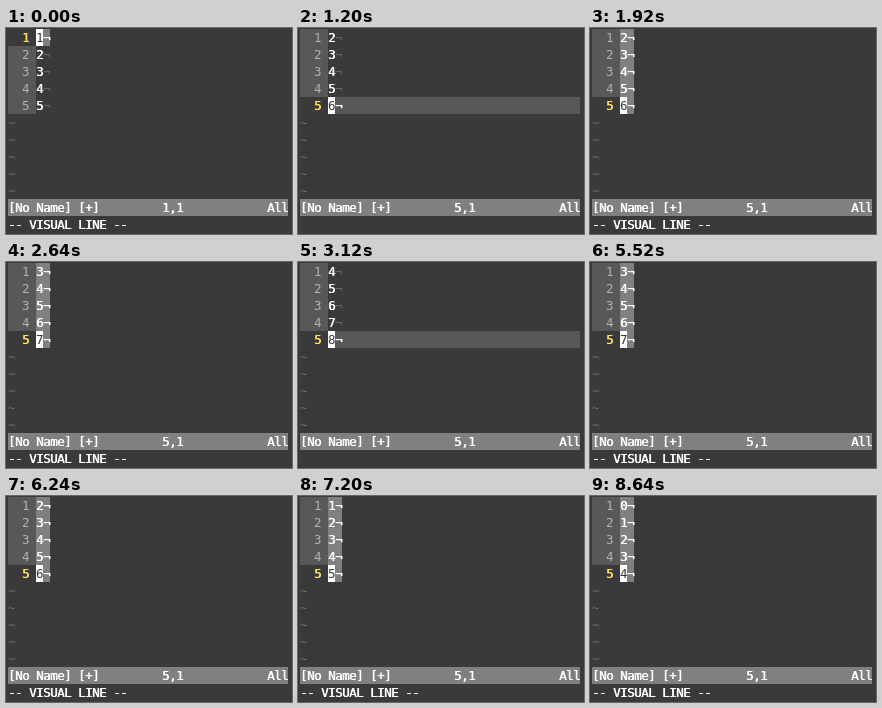
Recreate the animation shown at these times as an HTML page. Size 286 by 206 pixels, loop 9120 ms.

```html
<!DOCTYPE html>
<html lang="en">
<head>
<meta charset="utf-8">
<title>Incrementing lines</title>
<style>
  html, body { margin: 0; width: 100%; height: 100%; overflow: hidden; background: #3a3a3a; }
  #screen {
    position: absolute; left: 2px; top: 1px; width: 280px; height: 204px;
    font: 12.5px/17px "DejaVu Sans Mono", monospace; letter-spacing: -0.525px;
    color: #fff;
  }
  .row { position: relative; height: 17px; white-space: pre; }
  .row span { position: absolute; top: 0; height: 17px; }
  .num { left: 0; width: 28px; background: #585858; color: #b2b2b2; }
  .text { left: 28px; width: 7px; }
  .eol { left: 35px; width: 7px; color: #666; }
  .text, .status, #mode, .current .num, .line .eol, .selected .eol { text-shadow: 0.6px 0 currentColor; }
  .current .num { background: none; color: #ffe066; }
  .current .text { background: #fff; color: #3a3a3a; text-shadow: none; }
  .line::before { content: ""; position: absolute; left: 28px; right: 0; height: 17px; background: #585858; }
  .line .eol, .selected .eol { color: #fff; }
  .selected .text, .selected .eol { background: #808080; }
  .selected.current .text { background: #fff; }
  .tilde { color: #6c6c6c; }
  .status { background: #808080; }
  #pos { left: 154px; }
  .all { left: 259px; }
</style>
</head>
<body>
<div id="screen"></div>
<script>
const LOOP = 9120, LINES = 5;

// start ms, first value, cursor line, visual mode
const steps = [
  [0, 1, 1, true],
  [240, 1, 5, true],
  [1200, 2, 5, false],
  [1920, 2, 5, true],
  [2160, 3, 5, false],
  [2640, 3, 5, true],
  [2880, 4, 5, false],
  [4320, 4, 5, true],
  [4800, 3, 5, false],
  [5520, 3, 5, true],
  [5760, 2, 5, false],
  [6240, 2, 5, true],
  [6720, 1, 5, false],
  [7200, 1, 5, true],
  [7440, 0, 5, false],
  [8640, 0, 5, true]
];

const screen = document.getElementById("screen");
const lineRow = (_, i) =>
  `<div class="row"><span class="num">  ${i + 1} </span>` +
  `<span class="eol">¬</span><span class="text"></span></div>`;

screen.innerHTML =
  Array.from({ length: LINES }, lineRow).join("") +
  '<div class="row tilde">~</div>'.repeat(5) +
  '<div class="row status">[No Name] [+]<span id="pos"></span><span class="all">All</span></div>' +
  '<div class="row" id="mode"></div>';

const rows = [...screen.children].slice(0, LINES);
const texts = rows.map(row => row.querySelector(".text"));
const pos = document.getElementById("pos");
const mode = document.getElementById("mode");

function show([, first, cursor, visual]) {
  rows.forEach((row, i) => {
    const current = i + 1 === cursor;
    texts[i].textContent = first + i;
    row.classList.toggle("current", current);
    row.classList.toggle("line", current && !visual);
    row.classList.toggle("selected", visual && i < cursor);
  });
  pos.textContent = `${cursor},1`;
  mode.textContent = visual ? "-- VISUAL LINE --" : "";
}

let shown;
function tick() {
  const t = performance.now() % LOOP;
  const step = steps.findLast(s => s[0] <= t);
  if (step !== shown) show(shown = step);
  requestAnimationFrame(tick);
}
tick();
</script>
</body>
</html>
```
